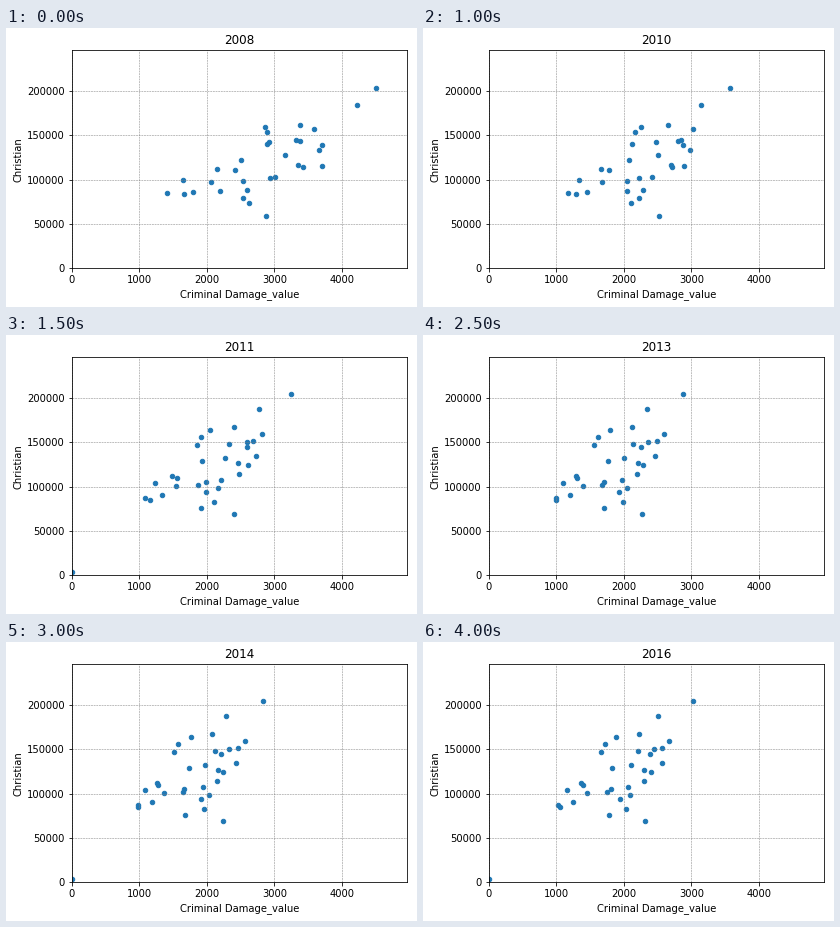
A matplotlib script that plays this animation: 411 by 279 pixels, repeating every 4500 ms.

```python
import numpy as np
import matplotlib.pyplot as plt
from matplotlib.animation import FuncAnimation

W, H, DPI = 411, 279, 72
FIRST, LOW, LAST = 2008, 2014, 2016
CENSUS = 2011                      # populations are renewed in this year
AREAS = 32

# Population in thousands by rank: key points of a falling curve.
POP_OLD = {0: 203.5, 1: 184, 2: 162, 5: 154, 6: 144.5, 10: 139.5, 14: 117,
           18: 110.5, 19: 103, 23: 97, 24: 88, 28: 84, 30: 74, 31: 59}
POP_NEW = {0: 205, 1: 188, 2: 167.5, 6: 151.5, 10: 145, 11: 134.5, 15: 124,
           16: 114, 19: 107, 24: 98.5, 26: 90, 29: 82, 31: 69}

# Damage by rank in the first year and in the year of the lowest level.
HIGH_DAMAGE = np.array([
    4510, 4225, 3385, 2865, 3590, 2895, 3325, 3385, 2925, 2895, 3710,
    3665, 3160, 2510, 3355, 3700, 3425, 2150, 2415, 3010, 2940, 1650,
    2540, 2065, 2600, 2195, 1795, 1415, 1665, 2540, 2625, 2880])
LOW_DAMAGE = np.array([
    2835, 2290, 2080, 1765, 2560, 1580, 2465, 2330, 2120, 1515, 2215,
    2425, 1975, 1740, 2170, 2245, 2155, 1265, 1270, 1950, 1665, 1090,
    1645, 1370, 2025, 1920, 1185, 980, 980, 1965, 1680, 2245])
TINY_AREA = (0, 3500)


def population(year):
    keys = POP_OLD if year < CENSUS else POP_NEW
    return 1000 * np.interp(range(AREAS), list(keys), list(keys.values()))


def damage(year):
    """Falls ever more slowly to the low year, then rises along the same parabola."""
    rest = ((LOW - year) / (LOW - FIRST)) ** 2
    return LOW_DAMAGE + rest * (HIGH_DAMAGE - LOW_DAMAGE)


def points(year):
    pts = np.column_stack([damage(year), population(year)])
    has_tiny = year >= CENSUS and year != 2013
    return np.vstack([pts, TINY_AREA]) if has_tiny else pts


plt.rcParams["font.family"] = "DejaVu Sans"
fig = plt.figure(figsize=(W / DPI, H / DPI), dpi=DPI, facecolor="white")
ax = fig.add_axes([65.85 / W, 39.09 / H, 334.8 / W, 217.44 / H])
ax.set(xlim=(0, 4961), ylim=(0, 246026),
       xlabel="Criminal Damage_value", ylabel="Christian")
ax.set_xticks(range(0, 5000, 1000))
ax.set_yticks(range(0, 250000, 50000))
ax.grid(color="grey", linestyle="--", linewidth=0.5)
dots = ax.scatter([], [], s=20, color="#1f77b4")
title = ax.set_title(str(FIRST))


def draw(i):
    year = FIRST + i
    dots.set_offsets(points(year))
    title.set_text(str(year))
    return dots, title


anim = FuncAnimation(fig, draw, frames=LAST - FIRST + 1, interval=500,
                     init_func=lambda: draw(0), repeat=True, repeat_delay=0)
plt.show()
```
